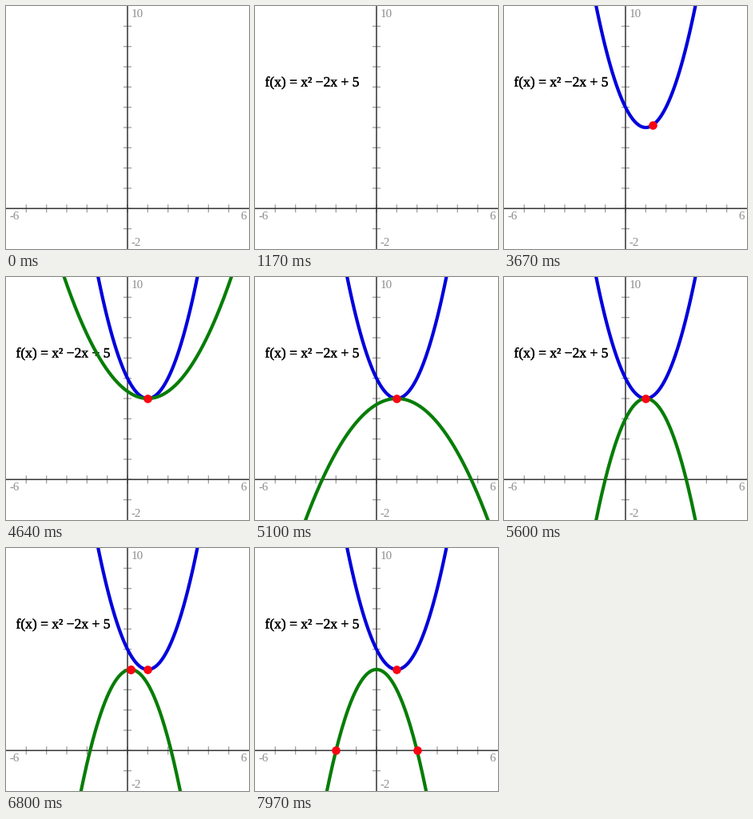
A matplotlib script for the animation above (8000 ms loop, 304x304 px).

```python
import numpy as np
import matplotlib.pyplot as plt
from matplotlib.animation import FuncAnimation
from matplotlib.patheffects import withStroke

SIZE, DPI = 304, 100
STEP, LOOP = 20, 8000
PT = 72 / DPI            # points per pixel
UNIT = SIZE / 12         # pixels per graph unit
BLUE, GREEN, RED = "#0000dc", "#067d06", "#fa0512"
AXIS, TICK, LABEL = "#303030", "#a0a0a0", "#8c8c8c"

fig = plt.figure(figsize=(SIZE / DPI, SIZE / DPI), dpi=DPI, facecolor="white")
ax = fig.add_axes([0, 0, 1, 1])
ax.set(xlim=(-6, 6), ylim=(-2, 10))
ax.axis("off")


def line(xs, ys, color, width, z):
    return ax.plot(xs, ys, color=color, lw=width * PT, zorder=z,
                   solid_capstyle="butt", snap=False)[0]


def label(px, py, text, size, color, align="left"):
    return ax.text(px / UNIT - 6, 10 - py / UNIT, text, color=color,
                   fontsize=size * PT, family="Liberation Serif",
                   ha=align, va="baseline", zorder=3)


def draw_grid():
    tick = 5 / UNIT
    for n in range(-5, 6):
        line([n, n], [-tick, tick], TICK, 1.3, 1)
    for n in range(-1, 10):
        line([-tick, tick], [n, n], TICK, 1.3, 1)
    line([-6, 6], [0, 0], AXIS, 1.5, 2)
    line([0, 0], [-2, 10], AXIS, 1.5, 2)
    label(156.5, 13.7, "10", 15, LABEL)
    label(156.5, 299.5, "-2", 15, LABEL)
    label(4.3, 267, "-6", 15, LABEL)
    label(300.7, 267, "6", 15, LABEL, "right")


def parabola(x, a=1, h=1):
    return a * (x - h) ** 2 + 4


def progress(t, start, end):
    return min(max((t - start) / (end - start), 0), 1)


draw_grid()
formula = label(12.5, 100.5, "f(x) = x² −2x + 5", 17.5, "black")
formula.set_path_effects([withStroke(linewidth=0.4 * PT, foreground="black")])
blue = line([], [], BLUE, 4.2, 4)
green = line([], [], GREEN, 4.2, 5)
dots = ax.plot([], [], "o", color=RED, ms=10.6 * PT, mew=0, zorder=6)[0]
wide = np.linspace(-6.2, 6.2, 250)


def update(i):
    t = i * STEP
    formula.set_visible(t >= 1070)

    # the curve is traced from left to right
    blue.set_visible(t >= 2500)
    xs = np.linspace(-1.6, -1.02 + 4.6 * progress(t, 2500, 3060), 120)
    blue.set_data(xs, parabola(xs))

    # the copy flips over, then slides to the y axis
    green.set_visible(t >= 4140)
    a = 1 - 2 * progress(t, 4180, 5600)
    h = 1 - progress(t, 5700, 7000)
    green.set_data(wide, parabola(wide, a, h))

    points = []
    if t >= 3040:
        ease = (1 - np.cos(np.pi * progress(t, 3030, 3860))) / 2
        x = 3.45 - 2.45 * ease
        points.append((x, parabola(x)))
    if t >= 5700:
        # the second vertex splits into two roots
        spread = 2 * progress(t, 7050, 7680)
        points += [(x, parabola(x, a, h)) for x in (h - spread, h + spread)]
    dots.set_data([p[0] for p in points], [p[1] for p in points])
    return formula, blue, green, dots


anim = FuncAnimation(fig, update, frames=LOOP // STEP, interval=STEP,
                     init_func=lambda: update(0), repeat=True, repeat_delay=0)
plt.show()
```
